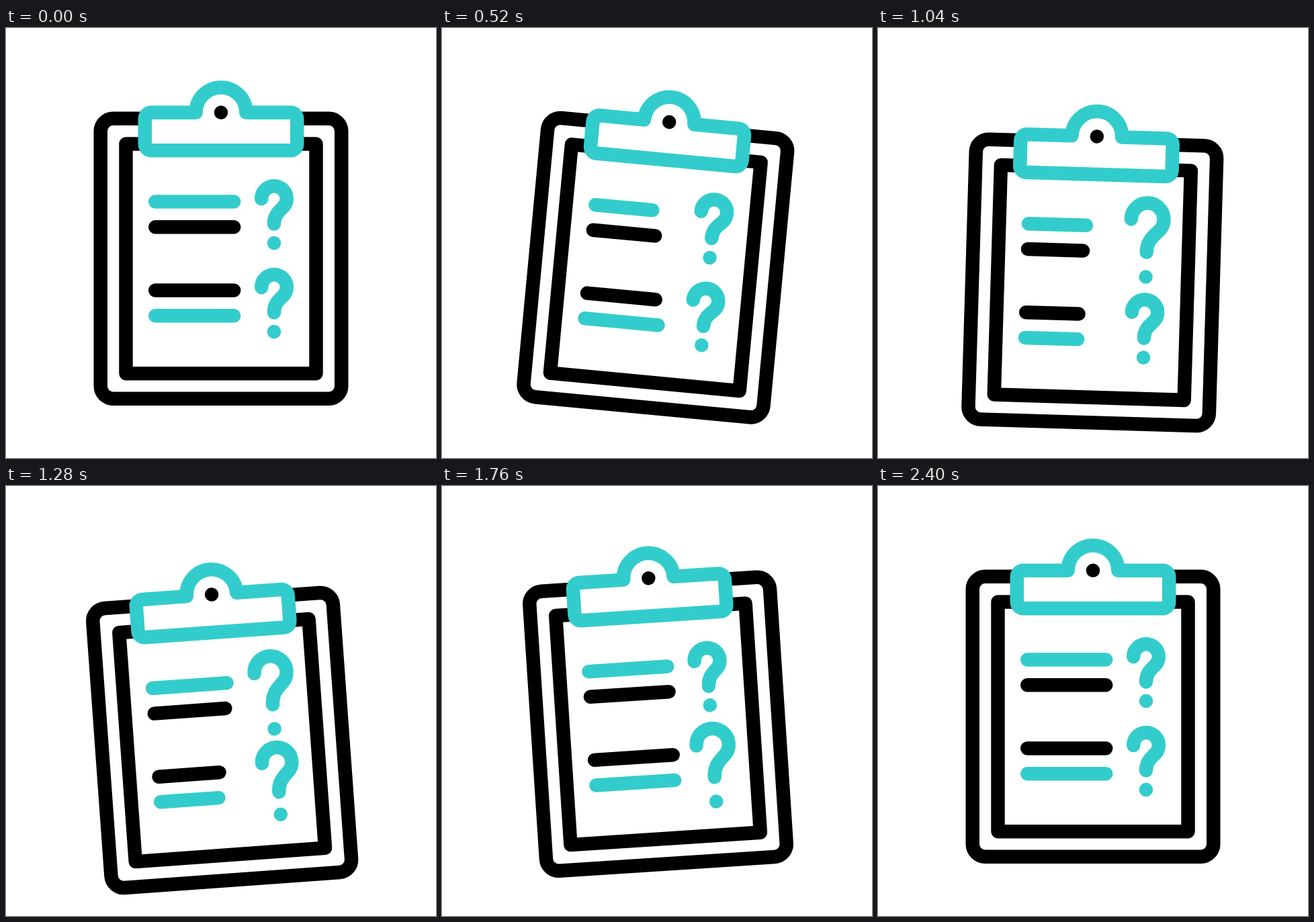
An HTML page with a canvas for the animation above (2.44 s loop, 640 by 640 pixels).

```html
<!DOCTYPE html>
<html lang="en">
<head>
<meta charset="utf-8">
<title>Clipboard quiz</title>
<style>
html, body { margin: 0; width: 100%; height: 100%; overflow: hidden; background: #fff; }
canvas { display: block; width: 640px; height: 640px; }
</style>
</head>
<body>
<canvas id="stage" width="640" height="640"></canvas>
<script>
const ctx = document.getElementById('stage').getContext('2d');
const STEP = 40, STEPS = 61;
const TEAL = '#33cccc', BLACK = '#000';
const STROKE = 20.5, DOT = 10.25;

// Cubic easing with control points (a, 0) and (b, 1)
function ease(x, a, b) {
  if (x <= 0) return 0;
  if (x >= 1) return 1;
  let lo = 0, hi = 1;
  for (let i = 0; i < 24; i++) {
    const u = (lo + hi) / 2, v = 1 - u;
    if (3 * v * v * u * a + 3 * v * u * u * b + u * u * u < x) lo = u; else hi = u;
  }
  return lo * lo * (3 - 2 * lo);
}

// Each segment: start, end, change in value, easing a, easing b
function sum(t, segments) {
  return segments.reduce((v, [from, to, delta, a = 0.6, b = 0.4]) =>
    v + delta * ease((t - from) / (to - from), a, b), 0);
}

const lift = t => sum(t, [[0, 29, 36], [29, 57, -36, 0.47, 0.37]]);
const tilt = t => sum(t, [[0, 18, 6], [18, 36, -11, 0.5, 0.5], [36, 58, 5, 0.6, 0.28]]);

const bars = [
  { y: 258.6, color: TEAL, shrink: 0, grow: 19.2 },
  { y: 296.3, color: BLACK, shrink: 2, grow: 20.7 },
  { y: 390.6, color: BLACK, shrink: 4, grow: 24 },
  { y: 428.3, color: TEAL, shrink: 6, grow: 25 }
];

const questions = [
  { y: 277.6, keys: [8, 28, 48] },
  { y: 409.5, keys: [22, 40.5, 60] }
];

function stroke(color, trace) {
  ctx.beginPath();
  trace();
  ctx.strokeStyle = color;
  ctx.stroke();
}

function dot(x, y, color) {
  ctx.beginPath();
  ctx.arc(x, y, DOT, 0, Math.PI * 2);
  ctx.fillStyle = color;
  ctx.fill();
}

function drawBoard() {
  stroke(BLACK, () => ctx.roundRect(140.75, 134.8, 358.5, 417, 18.75));
  stroke(BLACK, () => ctx.rect(178.5, 172.5, 283, 341.7));
}

function drawClip() {
  const left = 206.8, right = 433.2, top = 125.7, bottom = 182.2, r = 9.4;
  ctx.beginPath();
  ctx.moveTo(282.7, top);
  ctx.arc(320, top, 37.3, Math.PI, 0);
  ctx.arcTo(right, top, right, bottom, r);
  ctx.arcTo(right, bottom, left, bottom, r);
  ctx.arcTo(left, bottom, left, top, r);
  ctx.arcTo(left, top, 282.7, top, r);
  ctx.closePath();
  ctx.fillStyle = '#fff';
  ctx.fill();
  ctx.strokeStyle = TEAL;
  ctx.stroke();
  dot(320, top, BLACK);
}

function drawBar(bar, t) {
  const length = 117 + sum(t, [[bar.shrink, bar.shrink + 20, -39], [bar.grow, bar.grow + 19, 39]]);
  stroke(bar.color, () => {
    ctx.moveTo(222.2, bar.y);
    ctx.lineTo(222.2 + length, bar.y);
  });
}

// The outline scales about its centre while the line weight stays constant
function drawQuestion({ y, keys: [start, peak, end] }, t) {
  const s = 1 + sum(t, [[start, peak, 0.3], [peak, end, -0.3, 0.52, 0.26]]);
  const px = x => 399 + x * s, py = v => y + v * s;
  stroke(TEAL, () => {
    ctx.arc(px(0), py(-23.6), 18.8 * s, Math.PI, 0);
    ctx.bezierCurveTo(px(18.8), py(-18.2), px(16.4), py(-13.4), px(12.6), py(-10));
    ctx.bezierCurveTo(px(4.2), py(-2.2), px(0), py(3.5), px(0), py(14));
  });
  dot(px(0), py(42.4), TEAL);
}

function draw(t) {
  ctx.setTransform(1, 0, 0, 1, 0, 0);
  ctx.fillStyle = '#fff';
  ctx.fillRect(0, 0, 640, 640);
  ctx.translate(320, 320 + lift(t));
  ctx.rotate(tilt(t) * Math.PI / 180);
  ctx.translate(-320, -320);
  ctx.lineWidth = STROKE;
  ctx.lineCap = ctx.lineJoin = 'round';
  drawBoard();
  drawClip();
  bars.forEach(bar => drawBar(bar, t));
  questions.forEach(q => drawQuestion(q, t));
}

const begin = performance.now();
function tick() {
  draw(Math.floor((performance.now() - begin) / STEP) % STEPS);
  requestAnimationFrame(tick);
}
tick();
</script>
</body>
</html>
```
